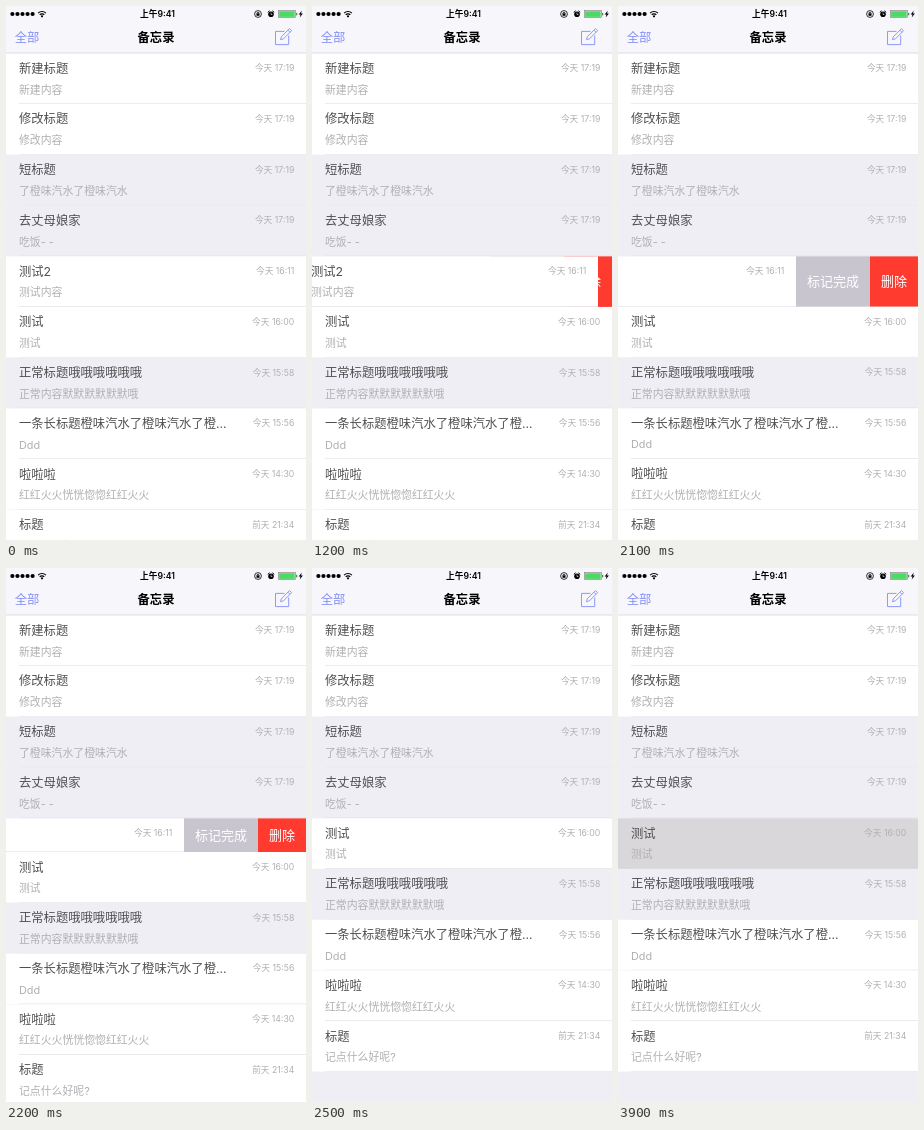
These frames come from a looping animation (300x534 px, 4000 ms). An HTML page with a canvas:

```html
<!DOCTYPE html>
<html lang="zh-CN">
<head>
<meta charset="utf-8">
<title>备忘录</title>
<style>
  html, body { margin: 0; width: 100%; height: 100%; overflow: hidden; background: #f0eef5; }
  canvas { display: block; width: 100%; height: 100%; }
</style>
</head>
<body>
<canvas id="stage"></canvas>
<script>
const W = 300, H = 534, LOOP = 4000, STEP = 100;
const TOP = 47.3, ROW = 50.72, SWIPED = 4;
const LILAC = '#f0eef5', BLUE = '#8290f8', GREY = '#b0b0b2';
const FONT = 'Inter, "Noto Sans CJK SC", "Noto Sans CJK", sans-serif';

const rows = [
  { title: '新建标题', body: '新建内容', time: '今天 17:19' },
  { title: '修改标题', body: '修改内容', time: '今天 17:19' },
  { title: '短标题', body: '了橙味汽水了橙味汽水', time: '今天 17:19', done: true },
  { title: '去丈母娘家', body: '吃饭- -', time: '今天 17:19', done: true },
  { title: '测试2', body: '测试内容', time: '今天 16:11' },
  { title: '测试', body: '测试', time: '今天 16:00' },
  { title: '正常标题哦哦哦哦哦哦', body: '正常内容默默默默默默哦', time: '今天 15:58', done: true },
  { title: '一条长标题橙味汽水了橙味汽水了橙...', body: 'Ddd', time: '今天 15:56' },
  { title: '啦啦啦', body: '红红火火恍恍惚惚红红火火', time: '今天 14:30' },
  { title: '标题', body: '记点什么好呢?', time: '前天 21:34' }
];

// Swipe offset over time: drag, overshoot, settle.
const swipeKeys = [[1100, 0], [1200, 14], [1300, 62], [1400, 112], [1500, 126.5],
                   [1600, 126.5], [1700, 124], [1800, 122]];

const canvas = document.getElementById('stage');
const ctx = canvas.getContext('2d');

function resize() {
  const ratio = window.devicePixelRatio || 1;
  canvas.width = Math.round(innerWidth * ratio);
  canvas.height = Math.round(innerHeight * ratio);
}

function keyed(keys, t) {
  if (t <= keys[0][0]) return keys[0][1];
  for (let i = 1; i < keys.length; i++) {
    const [t0, v0] = keys[i - 1], [t1, v1] = keys[i];
    if (t <= t1) return v0 + (v1 - v0) * (t - t0) / (t1 - t0);
  }
  return keys[keys.length - 1][1];
}

function easeInOut(p) {
  p = Math.min(1, Math.max(0, p));
  return p < 0.5 ? 2 * p * p : 1 - 2 * (1 - p) * (1 - p);
}

function rect(x, y, w, h, color) {
  ctx.fillStyle = color;
  ctx.fillRect(x, y, w, h);
}

function text(str, x, midY, size, color, align = 'left', weight = 400) {
  ctx.font = `${weight} ${size}px ${FONT}`;
  ctx.textAlign = align;
  ctx.fillStyle = color;
  ctx.fillText(str, x, midY + size * 0.37);
}

function circle(x, y, r, fill) {
  ctx.beginPath();
  ctx.arc(x, y, r, 0, Math.PI * 2);
  if (fill) ctx.fill(); else ctx.stroke();
}

function line(points, close) {
  ctx.beginPath();
  points.forEach(([x, y]) => ctx.lineTo(x, y));
  if (close) ctx.closePath();
}

function stroke(points, close) {
  line(points, close);
  ctx.stroke();
}

function drawStatusBar() {
  ctx.fillStyle = ctx.strokeStyle = '#000';
  for (let i = 0; i < 5; i++) circle(6.4 + i * 5.05, 8, 2.1, true);

  ctx.lineWidth = 1.2;
  for (const r of [3.2, 5.5]) {
    ctx.beginPath();
    ctx.arc(36, 11, r, -Math.PI * 0.75, -Math.PI * 0.25);
    ctx.stroke();
  }
  circle(36, 10.3, 1.1, true);

  text('上午9:41', 151.5, 8, 8.7, '#000', 'center', 600);

  // Rotation lock
  ctx.lineWidth = 0.8;
  circle(252, 8, 3.4);
  rect(250.5, 7.6, 3, 2.2, '#000');
  circle(252, 7.3, 1);

  // Alarm
  circle(265, 8.3, 2.8, true);
  ctx.lineWidth = 1;
  stroke([[261.8, 6.3], [263.6, 4.8]]);
  stroke([[266.4, 4.8], [268.2, 6.3]]);
  ctx.strokeStyle = '#fff';
  ctx.lineWidth = 0.6;
  stroke([[265, 6.6], [265, 8.5], [266.4, 8.5]]);

  // Battery
  ctx.strokeStyle = '#777';
  ctx.strokeRect(272.4, 4.6, 17, 6.9);
  rect(273.1, 5.2, 15.6, 5.7, '#4cd964');
  rect(290.2, 6.9, 1, 2.4, '#555');
  line([[295.8, 4.6], [292.7, 8.5], [294.5, 8.5], [293.7, 11.6], [296.9, 7.4], [295, 7.4]], true);
  ctx.fillStyle = '#000';
  ctx.fill();
}

function drawHeader() {
  rect(0, 0, W, 46.6, '#f7f6fb');
  rect(0, 46.6, W, 0.7, '#d8d7dd');
  drawStatusBar();
  text('全部', 8.7, 31, 12.32, BLUE);
  text('备忘录', 150, 31, 12.32, '#000', 'center', 600);

  // Compose icon
  ctx.strokeStyle = BLUE;
  ctx.lineWidth = 0.9;
  stroke([[278.5, 25.4], [269.5, 25.4], [269.5, 38.6], [282.7, 38.6], [282.7, 29.5]]);
  stroke([[274.5, 33.6], [275.3, 30.8], [283.5, 22.6], [285.6, 24.7], [277.4, 32.9]], true);
  stroke([[281.9, 24.2], [284, 26.3]]);
}

function drawActions(y, h) {
  rect(0, y, W, h, '#e9e7f0');
  rect(178, y, 74, h, '#c8c5ce');
  rect(252, y, 48, h, '#ff3b30');
  text('标记完成', 215, y + h / 2, 13.04, '#fff', 'center');
  text('删除', 276, y + h / 2, 13.04, '#fff', 'center');
}

function drawRow(row, y, h, shift, pressed) {
  ctx.save();
  ctx.beginPath();
  ctx.rect(0, y, W, h);
  ctx.clip();
  if (shift > 0) drawActions(y, h);
  ctx.translate(-shift, 0);
  rect(0, y, W, h, pressed ? '#d9d7da' : row.done ? LILAC : '#fff');
  text(row.title, 13, y + 14.9, 12.32, '#505052');
  text(row.body, 13, y + 36.2, 10.87, GREY);
  text(row.time, 288.3, y + 14.7, 8.7, GREY, 'right');
  rect(13, y + h - 0.6, W - 13, 0.6, '#dedde2');
  ctx.restore();
}

function draw(t) {
  ctx.setTransform(canvas.width / W, 0, 0, canvas.height / H, 0, 0);
  rect(0, 0, W, H, LILAC);
  const shift = keyed(swipeKeys, t);
  const collapse = easeInOut((t - 2090) / 270);
  let y = TOP;
  rows.forEach((row, i) => {
    const swiped = i === SWIPED;
    const h = swiped ? ROW * (1 - collapse) : ROW;
    if (h > 0) drawRow(row, y, h, swiped ? shift : 0, i === SWIPED + 1 && t >= 3900);
    y += h;
  });
  drawHeader();
}

function tick(now) {
  const t = now % LOOP;
  draw(Math.floor(t / STEP) * STEP);
  requestAnimationFrame(tick);
}

addEventListener('resize', resize);
resize();
requestAnimationFrame(tick);
</script>
</body>
</html>
```
